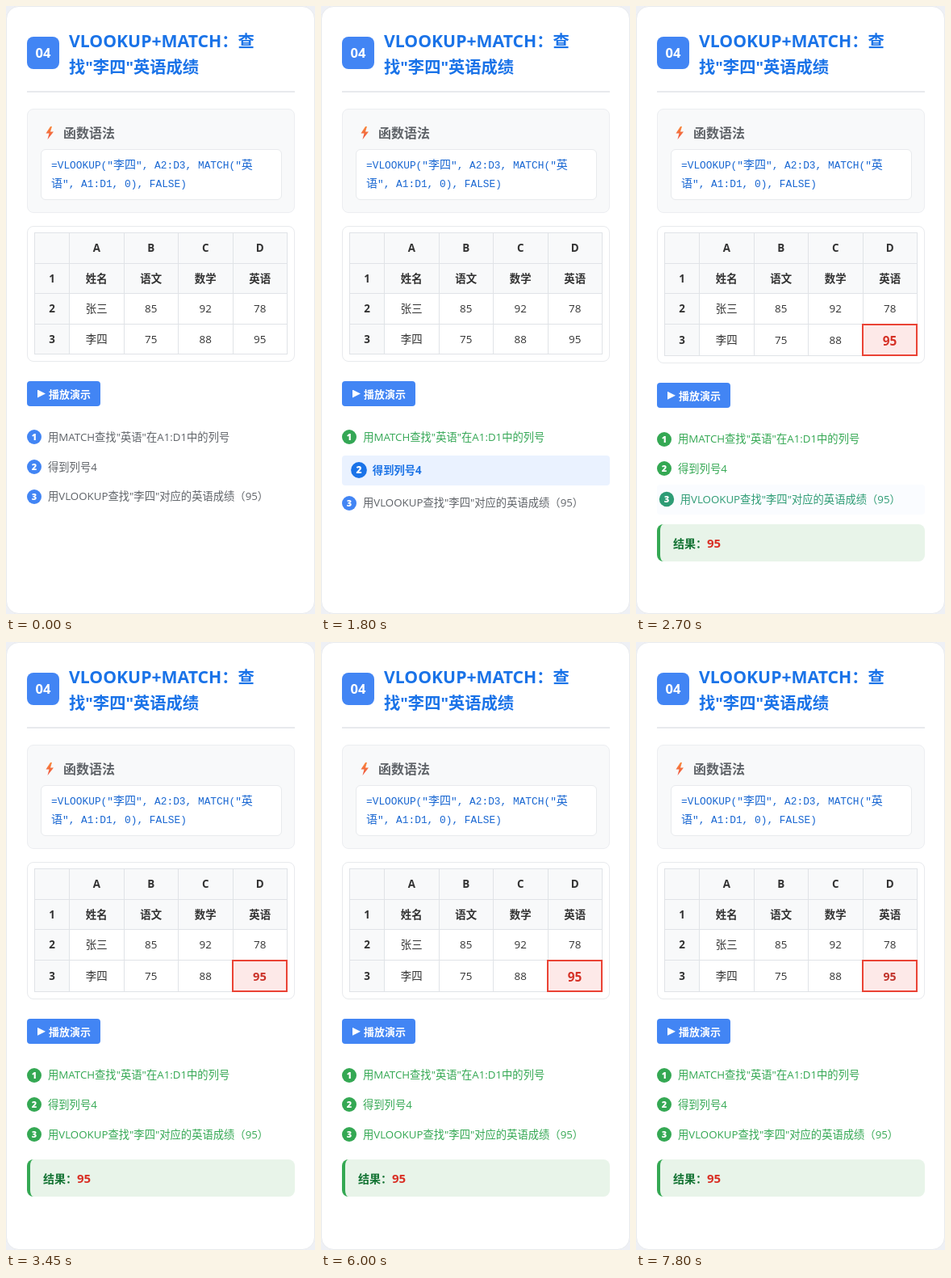
These frames come from a looping animation (383x752 px, 8 s). An HTML page:

```html
<!DOCTYPE html>
<html lang="zh-CN">
<head>
<meta charset="utf-8">
<title>VLOOKUP+MATCH</title>
<style>
@property --on { syntax: '<number>'; inherits: true; initial-value: 0; }
@property --dot { syntax: '<color>'; inherits: true; initial-value: #4285f4; }
:root { --blue: #1a73e8; --green: #34a853; --gray: #5f6368; --line: #e8eaed; --loop: 8s infinite; }
* { box-sizing: border-box; }
html, body { margin: 0; width: 100%; height: 100%; overflow: hidden; background: #eef0f5; }
body { font-family: 'Open Sans', 'Noto Sans CJK SC', 'Noto Sans CJK', sans-serif; }
.card { position: relative; width: 383px; height: 752px; background: #fff; border: 1px solid var(--line); border-radius: 16px; }
.card > * { position: absolute; left: 25px; width: 332px; }

.card > .badge { top: 37px; width: 40px; height: 40px; border-radius: 8px; background: #4285f4; color: #fff; font: 700 16.5px/40px 'Open Sans', sans-serif; text-align: center; }
h1 { top: 26px; margin: 0; padding-left: 52px; color: var(--blue); font-size: 20.3px; line-height: 32px; white-space: nowrap; }
h1 span { font-size: 21.2px; }
.rule { top: 104px; height: 2px; background: var(--line); }

.syntax { top: 126px; height: 129px; background: #f8f9fa; border: 1px solid #eceef1; border-radius: 8px; }
.syntax svg { position: absolute; left: 21px; top: 20px; }
h2 { position: absolute; left: 44px; top: 17px; margin: 0; color: var(--gray); font-size: 16px; line-height: 24px; }
code { position: absolute; left: 16px; top: 49px; width: 299px; height: 63px; padding: 8px 0 0 12px; background: #fff; border: 1px solid var(--line); border-radius: 6px; color: #1967d2; font: 12.83px/23px 'Liberation Mono', 'Noto Sans CJK SC', monospace; white-space: pre; }
code i { font: 14px/1 'Noto Sans CJK SC', 'Noto Sans CJK', sans-serif; }

.flow { top: 271px; }
.sheet { position: relative; height: 168px; padding: 7px 8px; border: 1px solid var(--line); border-radius: 8px; animation: grow var(--loop) step-end; }
table { width: 314px; height: 151px; table-layout: fixed; border-collapse: collapse; color: #333; font-size: 13.4px; line-height: 20px; text-align: center; animation: growTable var(--loop) step-end; }
tr { height: 37.6px; }
tr:last-child { height: auto; }
th, td { padding: 0; border: 1px solid #e0e3e7; }
th { background: #f8f9fa; }
th:first-child { width: 43px; }
.hit { position: absolute; left: 253px; top: 120px; width: 69px; height: 40px; border: 2px solid #ea4335; background: #fde9e8; font-size: 13.8px; font-weight: 700; line-height: 37px; text-align: center; opacity: 0; animation: show var(--loop) step-end; }
.hit b { display: block; animation: pulse var(--loop) ease-in-out; }

button { display: flex; align-items: center; gap: 4px; width: 91px; height: 31px; margin-top: 24px; padding: 0 0 0 13px; border: 0; border-radius: 4px; background: #4285f4; color: #fff; font: 700 13px/31px 'Noto Sans CJK SC', 'Noto Sans CJK', sans-serif; white-space: nowrap; }
button::before { content: ''; flex: none; width: 10px; height: 10px; background: #fff; clip-path: polygon(0 0, 100% 50%, 0 100%); }

ol { margin: 20px 0 0; padding: 0; list-style: none; }
li { display: flex; align-items: center; gap: 8px; height: 36.8px; margin: calc(4px * var(--on)) 0; padding-left: calc(12px * var(--on)); border-radius: 4px; background: rgb(234 242 255 / var(--on)); color: var(--gray); font-size: 13.3px; line-height: 21px; white-space: nowrap; }
li i { flex: none; width: 18px; height: 18px; border-radius: 50%; background: var(--dot); color: #fff; font: 800 11px/18px 'Open Sans', sans-serif; text-align: center; transform: scale(calc(1 + .1 * var(--on))); }
li:nth-child(1) { animation: step1 var(--loop) ease; }
li:nth-child(2) { animation: step2 var(--loop) ease; }
li:nth-child(3) { animation: step3 var(--loop) ease; }

.result { height: 46px; margin-top: 12.6px; padding-left: 16px; border-left: 4px solid var(--green); border-radius: 8px; background: #e8f4e9; color: #137333; font-size: 14px; font-weight: 700; line-height: 46px; opacity: 0; animation: reveal var(--loop) ease; }
.result b { color: #d93025; font-size: 15px; }

@keyframes grow { 27% { height: 170.3px; } 100% { height: 170.3px; } }
@keyframes growTable { 27% { height: 153px; } 100% { height: 153px; } }
@keyframes show { 27% { opacity: 1; } 100% { opacity: 1; } }
@keyframes pulse {
  0%, 24.375%, 39.375%, 54.375%, 69.375%, 84.375%, 99.375%, 100% { transform: none; color: #bd352d; }
  31.875%, 46.875%, 61.875%, 76.875%, 91.875% { transform: scale(1.13); color: #d93025; }
}
@keyframes step1 {
  0%, 17.3% { --on: 0; --dot: #4285f4; color: var(--gray); font-weight: 400; }
  19%, 21.06% { --on: 1; --dot: var(--blue); color: var(--blue); font-weight: 700; }
  22.76%, 100% { --on: 0; --dot: var(--green); color: var(--green); font-weight: 400; }
}
@keyframes step2 {
  0%, 21.06% { --on: 0; --dot: #4285f4; color: var(--gray); font-weight: 400; }
  22.76%, 27% { --on: 1; --dot: var(--blue); color: var(--blue); font-weight: 700; }
  28.7%, 100% { --on: 0; --dot: var(--green); color: var(--green); font-weight: 400; }
}
@keyframes step3 {
  0%, 27% { --on: 0; --dot: #4285f4; color: var(--gray); font-weight: 400; }
  28.7%, 32.96% { --on: 1; --dot: var(--blue); color: var(--blue); font-weight: 700; }
  34.66%, 100% { --on: 0; --dot: var(--green); color: var(--green); font-weight: 400; }
}
@keyframes reveal {
  0%, 27% { opacity: 0; transform: translateY(20px); }
  29.85%, 100% { opacity: 1; transform: none; }
}
</style>
</head>
<body>
<main class="card">
  <div class="badge">04</div>
  <h1><span>VLOOKUP+MATCH</span>：查<br>找"李四"英语成绩</h1>
  <div class="rule"></div>
  <section class="syntax">
    <svg width="14" height="18" viewBox="0 0 14 18">
      <linearGradient id="spark" x2="0" y2="1"><stop stop-color="#f98a3c"/><stop offset="1" stop-color="#ee5040"/></linearGradient>
      <path d="M7 1 1.5 9.5H5.5L3.5 17 11 7.5H7L9 1Z" fill="url(#spark)"/>
    </svg>
    <h2>函数语法</h2>
    <code>=VLOOKUP("<i>李四</i>", A2:D3, MATCH("<i>英</i>
<i>语</i>", A1:D1, 0), FALSE)</code>
  </section>
  <section class="flow">
    <div class="sheet">
      <table>
        <tr><th></th><th>A</th><th>B</th><th>C</th><th>D</th></tr>
        <tr><th>1</th><th>姓名</th><th>语文</th><th>数学</th><th>英语</th></tr>
        <tr><th>2</th><td>张三</td><td>85</td><td>92</td><td>78</td></tr>
        <tr><th>3</th><td>李四</td><td>75</td><td>88</td><td>95</td></tr>
      </table>
      <div class="hit"><b>95</b></div>
    </div>
    <button>播放演示</button>
    <ol>
      <li><i>1</i><span>用MATCH查找"英语"在A1:D1中的列号</span></li>
      <li><i>2</i><span>得到列号4</span></li>
      <li><i>3</i><span>用VLOOKUP查找"李四"对应的英语成绩（95）</span></li>
    </ol>
    <div class="result">结果：<b>95</b></div>
  </section>
</main>
</body>
</html>
```
